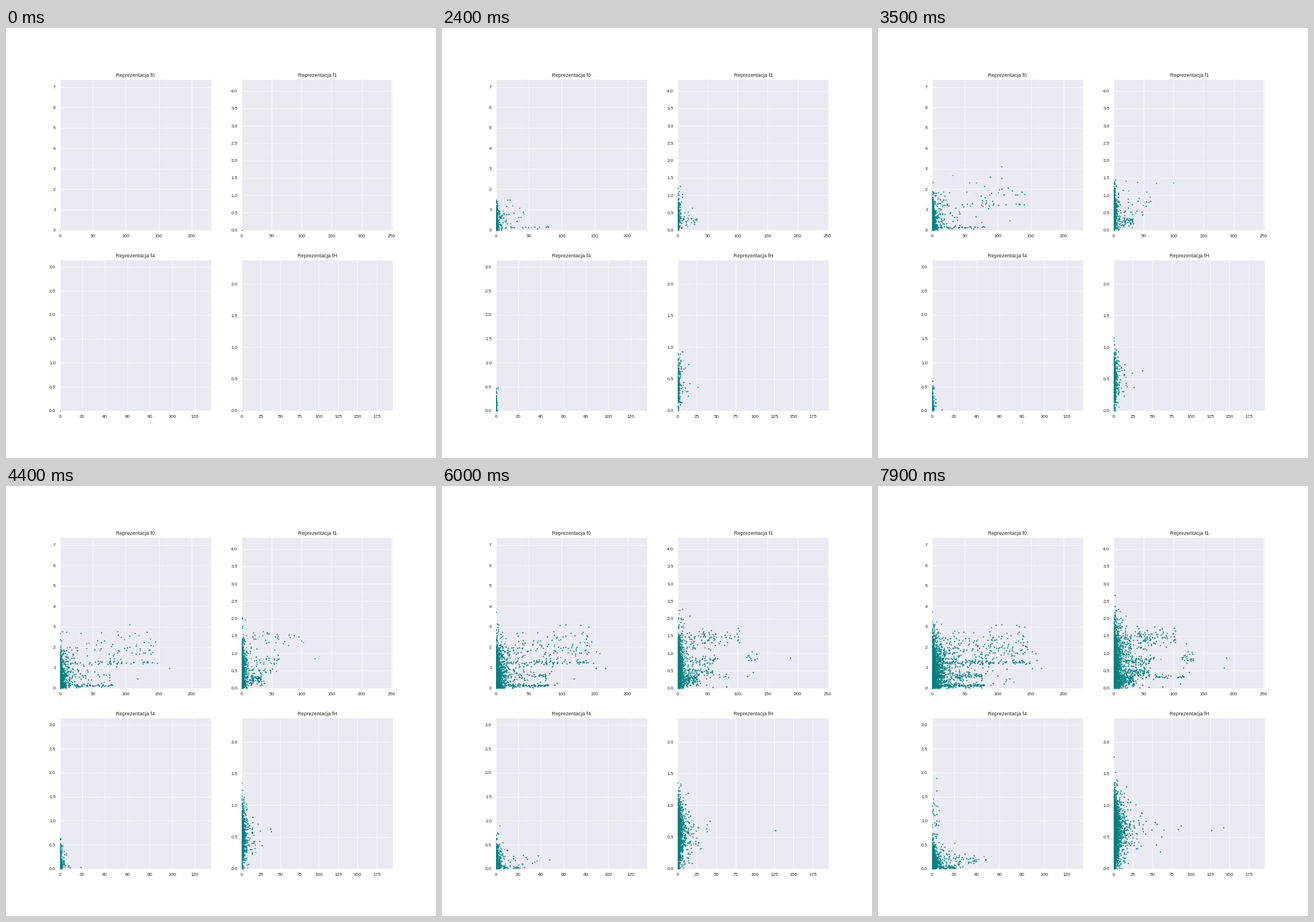
These frames come from a looping animation (748x748 px, 8000 ms). A matplotlib script:

```python
import numpy as np
import matplotlib.pyplot as plt
from matplotlib.animation import FuncAnimation

FRAMES, STEP = 80, 100          # frame count, ms per frame
END = FRAMES * STEP / 1000      # loop length in seconds
K = 0.5343                      # scale of all point sizes
TEAL, INK, PANEL = "#008080", "#262626", "#EAEAF2"

plt.rcParams["font.family"] = "Liberation Sans"


class Panel:
    """Scatter panel whose points appear one after another."""

    def __init__(self, ax, name, xlim, ylim, xstep, ystep, fmt=".1f"):
        self.rng = np.random.default_rng(len(fig.axes) + xstep)
        self.xmax = 0.75 * xlim
        self.parts = []
        ax.set_facecolor(PANEL)
        ax.set_axisbelow(True)
        ax.grid(color="white", lw=K)
        ax.spines[:].set_visible(False)
        ax.set_title(f"Reprezentacja {name}", fontsize=12 * K, pad=6 * K, color=INK)
        xticks, yticks = np.arange(0, xlim, xstep), np.arange(0, ylim, ystep)
        ax.set_xticks(xticks, [f"{v:.0f}" for v in xticks])
        ax.set_yticks(yticks, [format(v, fmt) for v in yticks])
        ax.tick_params(length=0, pad=9.5 * K, labelsize=11 * K, labelcolor=INK)
        ax.set(xlim=(0, xlim), ylim=(0, ylim))
        self.old = ax.scatter([], [], s=2.6, c=TEAL, lw=0)
        self.new = ax.scatter([], [], s=1.8, c=TEAL, lw=0)

    def add(self, t, x, y):
        keep = x < self.xmax
        self.parts.append(np.column_stack([t, x, np.abs(y)])[keep])

    def cloud(self, n, median, tail, mean, sd, widen=1, rise=0.4, taper=np.inf,
              start=0):
        """Log-normal in x, normal in y; both grow with the time of birth."""
        t = start + (END - start) * np.linspace(0, 1, n) ** 0.55
        s = t / END
        x = median * s ** widen * np.exp(tail * self.rng.normal(size=n))
        spread = sd / (1 + x / taper)
        y = s ** rise * (mean + spread * self.rng.normal(size=n))
        self.add(t, x, y)

    def streak(self, y, sd, x0, x1, start, density=1.2):
        """Level band of points between x0 and x1."""
        n = int(density * (x1 - x0))
        t = self.rng.uniform(start, END, n)
        x = self.rng.uniform(x0, x1, n)
        self.add(t, x, y + sd * self.rng.normal(size=n))

    def finish(self):
        pts = np.vstack(self.parts)
        pts = pts[np.argsort(pts[:, 0])]
        self.t, self.xy = pts[:, 0], pts[:, 1:]

    def show(self, t):
        a, b = np.searchsorted(self.t, [t - 0.3, t + 1e-6])
        self.old.set_offsets(self.xy[:a])
        self.new.set_offsets(self.xy[a:b])


fig, axes = plt.subplots(2, 2, figsize=(7.48, 7.48), dpi=100)
fig.subplots_adjust(left=0.125, right=0.9, bottom=0.11, top=0.88,
                    wspace=0.2, hspace=0.2)
ax0, ax1, ax4, axh = axes.flat

p0 = Panel(ax0, "f0", 229.7, 7.36, 50, 1, ".0f")
p0.cloud(2300, 5, 1.4, 1, 0.9, widen=0.7)
p0.streak(0.14, 0.03, 0, 82, 1.5)
p0.streak(0.6, 0.06, 35, 77, 3.5)
p0.streak(1.27, 0.05, 10, 150, 2.4, density=0.7)
p0.streak(2, 0.4, 20, 145, 2.5)

p1 = Panel(ax1, "f1", 252.3, 4.327, 50, 0.5)
p1.cloud(2200, 5, 1.2, 0.8, 0.6)
p1.streak(0.25, 0.08, 0, 33, 1.7, density=4)
p1.streak(0.45, 0.06, 20, 60, 3, density=2)
p1.streak(0.8, 0.07, 20, 67, 3)
p1.streak(1.45, 0.14, 15, 106, 3.2)
p1.streak(0.87, 0.1, 113, 133, 4)
p1.streak(0.33, 0.02, 52, 121, 5, density=0.4)

p4 = Panel(ax4, "f4", 134.8, 3.139, 20, 0.5)
p4.cloud(800, 2.8, 1.1, 0.15, 0.22, widen=1.7, rise=0.2, taper=40)
p4.cloud(45, 3, 0.9, 0.9, 0.45, start=5.5)
p4.streak(0.03, 0.02, 0, 22, 4, density=3)
p4.streak(0.19, 0.06, 20, 50, 5)

ph = Panel(axh, "fH", 196, 2.3725, 25, 0.5)
ph.cloud(2100, 3.2, 1.15, 0.68, 0.33, widen=0.8, rise=0.3, taper=60)

panels = (p0, p1, p4, ph)
for p in panels:
    p.finish()


def update(i):
    for p in panels:
        p.show(i * STEP / 1000)
    return []


anim = FuncAnimation(fig, update, frames=FRAMES, interval=STEP, repeat=True,
                     repeat_delay=0)
plt.show()
```
